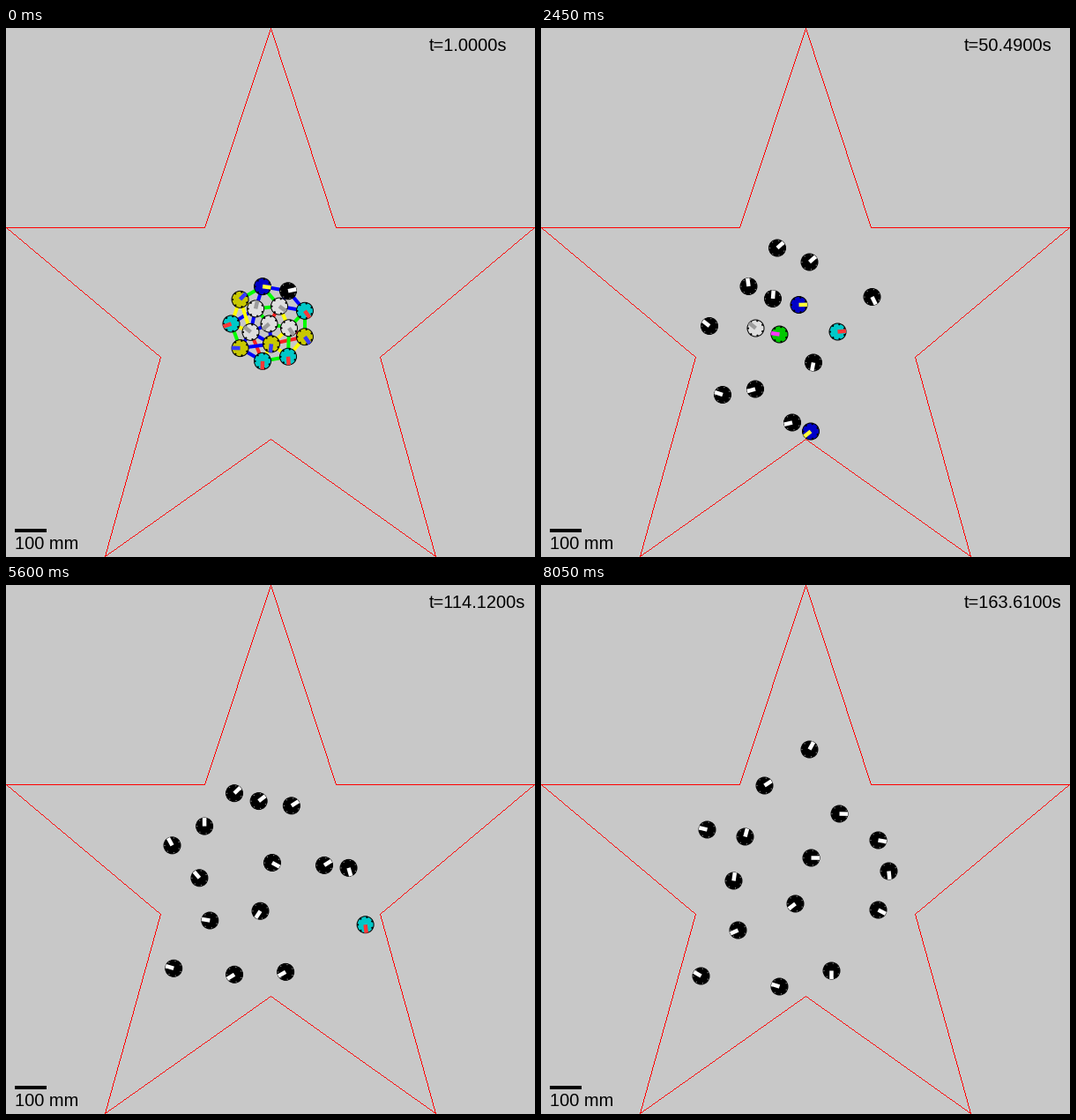
A matplotlib script for the animation above (8.1 s loop, 600 by 600 pixels).

```python
import itertools

import numpy as np
import matplotlib.pyplot as plt
from matplotlib.animation import FuncAnimation
from matplotlib.collections import LineCollection

FRAMES, STEP, SIZE = 162, 50, 600
PX = 0.72  # points per pixel at 100 dpi
RADIUS = 9.5
BURST = 31  # frames in which the cluster opens
LINK_FRAMES, LINK_REACH = 3, 40
LINK_COLOURS = ["#00ff00", "#ffff00", "#ff2020", "#0000ff"]
BODY = {"k": (0, 0, 0), "w": (222, 222, 222), "b": (0, 0, 200), "c": (0, 200, 200),
        "o": (200, 200, 0), "g": (0, 200, 0)}
BAR = {key: tuple(255 - v for v in rgb) for key, rgb in BODY.items()}
BAR["w"] = (155, 155, 155)

# Light colours in turn, then the places each robot heads for
ROBOTS = [
    ("bk", (270, 252), (265, 246), (253, 227)),
    ("k", (302, 291), (306, 239), (338, 259)),
    ("ck", (369, 293), (381, 316), (394, 324)),
    ("okck", (337, 337), (335, 351), (382, 289)),
    ("ck", (267, 454), (302, 440), (329, 437)),
    ("ccbck", (255, 419), (356, 495), (461, 569), (421, 394), (382, 368)),
    ("obk", (211, 407), (200, 424), (181, 443)),
    ("ck", (193, 359), (188, 316), (188, 277)),
    ("owk", (240, 393), (245, 425), (270, 455)),
    ("wck", (260, 299), (265, 314), (304, 186)),
    ("wwbk", (288, 306), (296, 321), (306, 309)),
    ("wbgk", (300, 327), (240, 367), (223, 391)),
    ("ok", (329, 379), (288, 379), (288, 361)),
    ("wck", (253, 326), (217, 259), (231, 285)),
    ("wwwk", (266, 352), (220, 328), (218, 335)),
]
ARRIVALS = {3: (BURST, 67, 150), 5: (BURST, 67, 79, 91, 150)}
SWITCHES = np.array([15, 40, 58, 111])

rng = np.random.default_rng(4)
COUNT = len(ROBOTS)
turn = rng.uniform(0, 1.4, COUNT)
phase = rng.uniform(0, 2 * np.pi, COUNT)
delay = rng.uniform(-6, 6, COUNT)


def ring(count, radius, first):
    a = np.radians(first + np.arange(count) * 360 / count)
    return np.column_stack([np.cos(a), np.sin(a)]) * radius


# Packed start: an outer ring, an inner ring and one in the middle
start = np.vstack([ring(9, 43, -100), ring(5, 23, -132), ring(1, 0, 0)]) + (298, 335)


def path(origin, stops):
    """Place of one robot in every frame."""
    n = np.arange(FRAMES)
    opening = BURST * (1 - np.clip(1 - n / BURST, 0, 1) ** 1.5)
    n = np.where(n < BURST, opening, n)
    keys = (0, *ARRIVALS[len(stops)])
    return np.column_stack([np.interp(n, keys, axis) for axis in zip(origin, *stops)])


paths = np.stack([path(p, r[1:]) for p, r in zip(start, ROBOTS)], axis=1)
pairs = [[a, b] for a, b in itertools.combinations(range(COUNT), 2)
         if np.hypot(*(start[a] - start[b])) < LINK_REACH]


def state(n):
    """Positions, headings and colour letters at frame n."""
    xy = paths[n]
    away = xy - (290, 330)
    heading = np.arctan2(away[:, 1], away[:, 0]) + turn + 0.5 * np.sin(n / 5 + phase)
    colours = [r[0][min(np.sum(n >= SWITCHES + d), len(r[0]) - 1)]
               for r, d in zip(ROBOTS, delay)]
    return xy + 0.5, heading, colours


def rgb(table, colours):
    return np.array([table[c] for c in colours]) / 255


def star_field():
    """Grey stage with a star drawn in single pixels."""
    field = np.full((SIZE, SIZE, 3), 200, np.uint8)
    right = [(300, 0), (374, 226), (599, 226), (424, 373), (487, 599), (300, 466)]
    left = [(SIZE - 1 - x, y) for x, y in right[-2:0:-1]]
    points = np.array(right + left)
    for a, b in zip(points, np.roll(points, -1, axis=0)):
        line = np.linspace(a, b, np.abs(b - a).max() + 1).round().astype(int)
        field[line[:, 1], line[:, 0]] = (255, 0, 0)
    return field


fig = plt.figure(figsize=(6, 6), dpi=100)
ax = fig.add_axes([0, 0, 1, 1])
ax.axis("off")
ax.imshow(star_field(), extent=(0, SIZE, SIZE, 0), interpolation="nearest", zorder=0)
ax.add_patch(plt.Rectangle((10, 568), 36, 4, color="black", lw=0))
font = dict(family="Liberation Sans", size=20 * PX, color="black", va="baseline")
ax.text(10, 591, "100 mm", **font)
clock = ax.text(480, 26, "", **font)

links = ax.add_collection(LineCollection(
    [], linewidths=4 * PX, colors=rng.choice(LINK_COLOURS, len(pairs)), zorder=2))
bodies = ax.scatter([], [], s=(2 * RADIUS * PX) ** 2, linewidths=PX,
                    edgecolors="black", zorder=3)
specks = ax.scatter([], [], linewidths=0, zorder=4)
bars = ax.add_collection(LineCollection([], linewidths=4.5 * PX, capstyle="butt", zorder=5))
rim = ring(7, RADIUS - 1, 25)


def draw(n):
    xy, heading, colours = state(n)
    clock.set_text(f"t={1 + 1.01 * n:.4f}s")
    links.set_segments(xy[pairs] if n < LINK_FRAMES else [])
    bodies.set_offsets(xy)
    bodies.set_facecolors(rgb(BODY, colours))

    dark = np.repeat([c == "k" for c in colours], len(rim))
    specks.set_offsets((xy[:, None] + rim).reshape(-1, 2))
    specks.set_sizes(np.where(dark, 1.2 * PX, 2.2 * PX) ** 2)
    specks.set_facecolors(np.where(dark[:, None], 0.65, np.zeros(3)))

    tip = np.column_stack([np.cos(heading), np.sin(heading)]) * RADIUS
    bars.set_segments(np.stack([xy, xy + tip], axis=1))
    bars.set_color(rgb(BAR, colours))
    return links, bodies, specks, bars, clock


anim = FuncAnimation(fig, draw, frames=FRAMES, interval=STEP, repeat=True)
plt.show()
```
